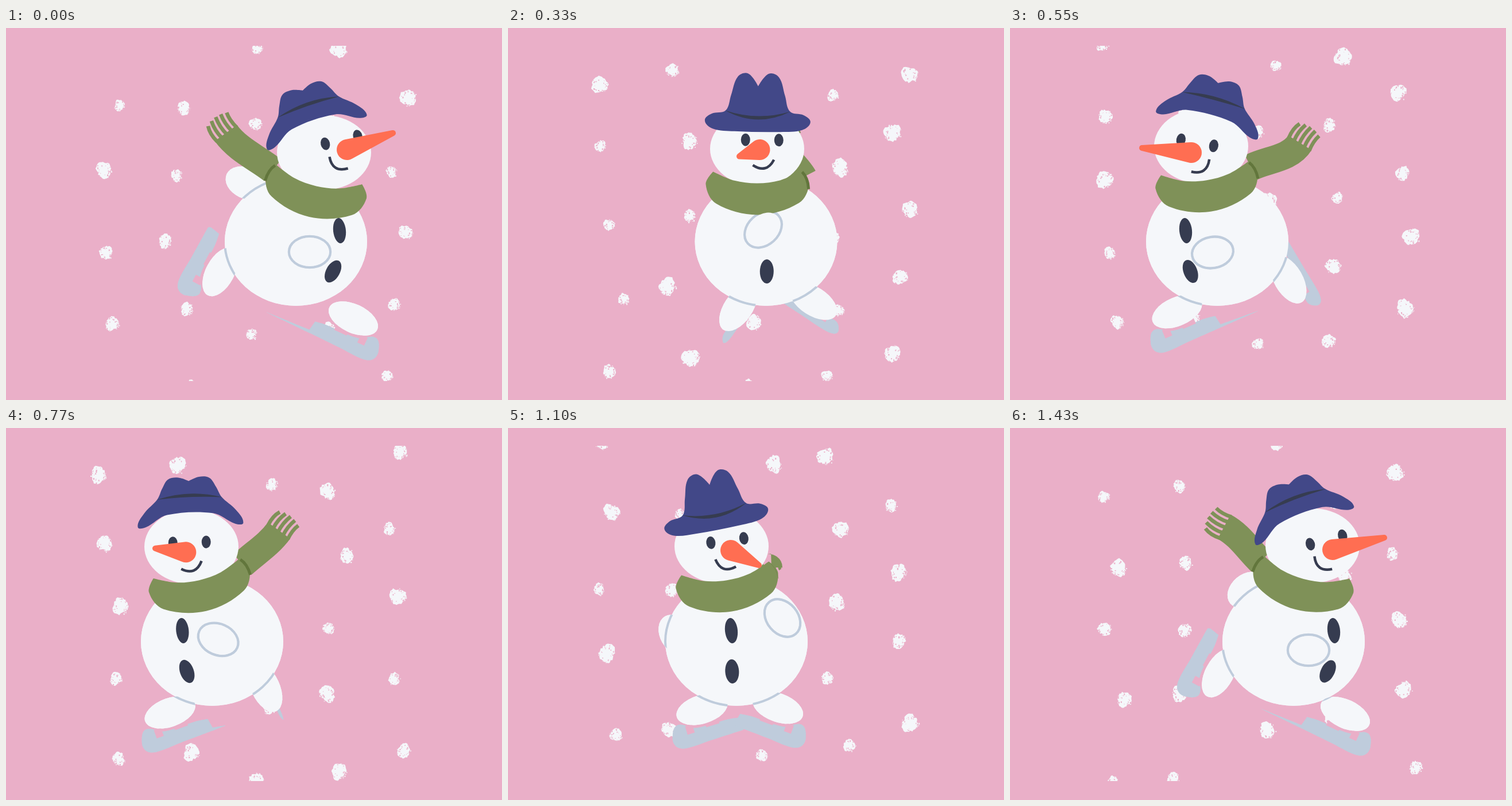
Recreate the animation shown at these times as an HTML page with a canvas. Size 864 by 648 pixels, loop 1540 ms.

```html
<!DOCTYPE html>
<html lang="en">
<head>
<meta charset="utf-8">
<title>Skating snowman</title>
<style>
  html, body { margin: 0; width: 100%; height: 100%; overflow: hidden; background: #eaafc8; }
  canvas { display: block; }
</style>
</head>
<body>
<canvas id="stage" width="864" height="648"></canvas>
<script>
const ctx = document.getElementById('stage').getContext('2d');
const PINK = '#eaafc8', SNOW = '#f5f7fa', ICE = '#bfccdc', NAVY = '#424888',
      INK = '#363c50', GREEN = '#7f9158', MOSS = '#62763c', CARROT = '#ff6e52';
const STEP = 110, COUNT = 14, RAD = Math.PI / 180;

// body: x. hat: tilt, curl of the brim. face: nose base seen from the head. nose: base to tip.
// hand, arm: x, y, turn. back, front foot: x, y, toe direction, side shown, runner length.
// tail: scarf end x, y, direction.
const poses = [
  { step: 0, body: 505, head: [554, 217], hat: [-19, 45], neck: 13, face: [40, -5], nose: [80, -29], chest: 76,
    hand: [529, 390, 0], arm: [418, 270, 25], back: [373, 425, 118, 1, 0], front: [605, 506, 25, 1, 82], tail: [383, 183, -126] },
  { step: 2, body: 510, head: [495, 205], hat: [2, 0], neck: 3, face: [13, 1], nose: [17, 0], chest: 28,
    hand: [448, 327, -35], arm: [640, 355, 90], back: [484, 485, 88, 0.35, 0], front: [567, 492, 20, 1, 0], tail: [403, 167, -88] },
  { step: 4, body: 389, head: [373, 216], hat: [0, 0], neck: -4, face: [-4, 2], nose: [-88, 23], chest: -25,
    hand: [441, 375, -50], arm: [283, 360, 90], back: [318, 490, 160, -1, 50], front: [497, 460, 45, 0.12, 0], tail: [544, 195, 5] },
  { step: 5, body: 361, head: [333, 206], hat: [15, 42], neck: -9, face: [-17, 11], nose: [-86, -8], chest: -55,
    hand: [353, 391, -10], arm: [361, 372, 60], back: [291, 494, 157, -1, 72], front: [485, 438, 60, -0.6, 0], tail: [505, 200, -58] },
  { step: 8, body: 358, head: [318, 207], hat: [-11, 47], neck: -15, face: [-6, 9], nose: [-37, -6], chest: -50,
    hand: [378, 357, 40], arm: [358, 372, 60], back: [283, 496, 162, -1, 0], front: [435, 458, 68, 0.12, 0], tail: [461, 168, -52] },
  { step: 10, body: 398, head: [372, 206], hat: [-11, 0], neck: -9, face: [16, 7], nose: [49, 26], chest: -9,
    hand: [478, 331, 50], arm: [292, 360, 60], back: [338, 490, 163, -1, 0], front: [470, 487, 20, 1, 0], tail: [454, 243, -90] },
  { step: 13, body: 494, head: [527, 205], hat: [-21, 45], neck: 15, face: [35, 7], nose: [90, -21], chest: 70,
    hand: [520, 387, 0], arm: [412, 282, -40], back: [365, 427, 118, 1, 0], front: [584, 498, 25, 1, 78], tail: [373, 172, -152] }
];

const mix = (a, b, k) => Array.isArray(a) ? a.map((v, i) => mix(v, b[i], k)) : a + (b - a) * k;

function poseAt(step) {
  const a = poses.filter(p => p.step <= step).pop();
  const b = poses.find(p => p.step > step) || { ...poses[0], step: COUNT };
  const k = (step - a.step) / (b.step - a.step);
  return Object.fromEntries(Object.keys(a).map(key => [key, mix(a[key], b[key], k)]));
}

function place([x, y], turn, paint) {
  ctx.save();
  ctx.translate(x, y);
  ctx.rotate(turn * RAD);
  paint();
  ctx.restore();
}

// Smooth closed curve through points; a third value marks a corner.
function blob(pts, color) {
  const n = pts.length, at = i => pts[(i + n) % n];
  const dir = i => {
    const [x, y] = at(i - 1), [u, v] = at(i + 1), d = Math.hypot(u - x, v - y) || 1;
    return at(i)[2] ? [0, 0] : [(u - x) / d, (v - y) / d];
  };
  ctx.fillStyle = color;
  ctx.beginPath();
  ctx.moveTo(pts[0][0], pts[0][1]);
  for (let i = 0; i < n; i++) {
    const p = at(i), q = at(i + 1), s = dir(i), e = dir(i + 1);
    const h = Math.hypot(q[0] - p[0], q[1] - p[1]) / 3;
    ctx.bezierCurveTo(p[0] + s[0] * h, p[1] + s[1] * h, q[0] - e[0] * h, q[1] - e[1] * h, q[0], q[1]);
  }
  ctx.fill();
}

function ovalPath(x, y, rx, ry, turn = 0) {
  ctx.beginPath();
  ctx.ellipse(x, y, rx, ry, turn * RAD, 0, Math.PI * 2);
}

function oval(color, ...shape) {
  ovalPath(...shape);
  ctx.fillStyle = color;
  ctx.fill();
}

function stroke(color, width) {
  ctx.strokeStyle = color;
  ctx.lineWidth = width;
  ctx.stroke();
}

function bow(color, width, x, y, cx, cy, u, v) {
  ctx.beginPath();
  ctx.moveTo(x, y);
  ctx.quadraticCurveTo(cx, cy, u, v);
  stroke(color, width);
}

// Mirrors a right half and joins both into one outline.
const mirror = half => [...half, ...half.slice().reverse().map(([x, y, c]) => [-x, y, c])];

function skate([x, y, toe, side, runner]) {
  place([x, y], toe, () => {
    ctx.scale(1, side);
    blob([[-60 - runner, 54, 1], [-61, 50, 1], [-58, 33, 1], [-38, 30], [20, 28], [50, 14],
          [64, 34], [61, 50], [45, 57], [0, 56], [-58, 55, 1]], ICE);
    ctx.fillStyle = PINK;
    ctx.fillRect(24, 20, 13, 15);
    ctx.fillRect(-22, 20, 24, 12);
  });
}

// Limbs sit behind the body; a seam follows the body's edge across each one.
function trunk(p) {
  const body = [p.body, 372, 124, 112];
  const limbs = [[...p.arm.slice(0, 2), 37, 27, p.arm[2]],
    ...[p.back, p.front].map(([x, y, toe]) => [x, y, 46, 25, toe])];
  skate(p.back);
  skate(p.front);
  for (const limb of limbs) oval(SNOW, ...limb);
  oval(SNOW, ...body);
  for (const limb of limbs) {
    ctx.save();
    ovalPath(...limb);
    ctx.clip();
    ovalPath(...body);
    stroke(ICE, 4);
    ctx.restore();
  }
  oval(INK, p.body + p.chest, 353, 11, 22, -6);
  oval(INK, p.body + p.chest * 0.85, 424, 12, 21, p.chest * 0.38);
}

function scarfTail(p) {
  const side = p.tail[0] < p.head[0] ? -1 : 1, c = Math.cos(p.neck * RAD), s = Math.sin(p.neck * RAD);
  const x = p.head[0] + side * 80 * c - 50 * s, y = p.head[1] + side * 80 * s + 50 * c;
  const [u, v, turn] = p.tail, reach = Math.hypot(u - x, v - y);
  const pull = reach * 0.35, a = turn * RAD;
  ctx.beginPath();
  ctx.moveTo(x, y);
  ctx.bezierCurveTo(mix(x, u, 0.33), mix(y, v, 0.33), u - Math.cos(a) * pull, v - Math.sin(a) * pull, u, v);
  stroke(GREEN, 48);
  const length = Math.min(30, reach / 3);
  place([u, v], turn, () => {
    for (let k = -1; k <= 1; k += 0.5)
      bow(GREEN, 6.5, -3, k * 21, length * 0.5, k * 21 - 3, length + 3 - 5 * k * k, k * 20 + 2);
  });
  return [side, Math.min(5, reach / 12)];
}

function scarf(p, [side, crease]) {
  place(p.head, p.neck, () => {
    ctx.translate(0, 39);
    blob([[-77, 0, 1], [-40, 16], [0, 21], [40, 16], [77, 0, 1],
          [90, 22], [72, 56], [0, 76], [-72, 56], [-90, 22]], GREEN);
    bow(MOSS, crease, side * 78, 2, side * 88, 12, side * 89, 32);
  });
}

function hat(p) {
  const [tilt, curl] = p.hat;
  const bend = ([x, y, c]) => {
    const soft = Math.max(0, Math.min(1, (y + 83) / 65));
    return [x, y - curl * (1 - (x / 92) ** 2) * soft, c];
  };
  const half = [[0, -61, 1], [18, -83], [36, -77], [47, -45], [56, -18], [80, -12], [92, 0], [78, 14], [40, 18]];
  place(p.head, tilt, () => {
    ctx.translate(0, curl * 0.22 - 48);
    blob(mirror(half).map(bend), NAVY);
    const [x, y] = bend([57, -18]), mid = bend([0, -6])[1] * 2 - y;
    ctx.fillStyle = INK;
    ctx.beginPath();
    ctx.moveTo(-x, y);
    ctx.quadraticCurveTo(0, mid - 6, x, y);
    ctx.quadraticCurveTo(0, mid + 6, -x, y);
    ctx.fill();
  });
}

function face(p) {
  const [dx, dy] = p.nose, base = [p.head[0] + p.face[0], p.head[1] + p.face[1]];
  const look = p.hat[0] * 0.7;
  place([base[0] - dx * 0.12, base[1] - 17], look, () => {
    for (const side of [-1, 1]) oval(INK, side * 29, 0, 8, 11);
  });
  place([base[0] - dx * 0.2, base[1] + 25], dx * 0.4, () => bow(INK, 4.5, -19, -3, 0, 18, 19, -3));
  place(base, Math.atan2(dy, dx) / RAD, () => {
    const length = Math.hypot(dx, dy), open = Math.acos(Math.min(1, 13 / length));
    ctx.fillStyle = CARROT;
    ctx.beginPath();
    ctx.arc(0, 0, 18, open, Math.PI * 2 - open);
    ctx.arc(length, 0, 5, -open, open);
    ctx.fill();
  });
}

const randomFrom = seed => () => (seed = (seed * 16807) % 2147483647) / 2147483647;

// Ragged lump with small chips punched around its rim.
function flake(x, y, r, rnd) {
  const sides = 30, lean = rnd() * 6, wobble = rnd() * 6;
  ctx.beginPath();
  for (let i = 0; i < sides; i++) {
    const a = i / sides * Math.PI * 2;
    const d = r * (0.95 + 0.08 * Math.sin(2 * a + lean) + 0.07 * Math.sin(3 * a + wobble) + (rnd() - 0.5) * 0.22);
    ctx.lineTo(x + Math.cos(a) * d, y + Math.sin(a) * d * 1.08);
  }
  ctx.closePath();
  for (let i = 0; i < 24; i++) {
    const a = rnd() * 7, d = r * (0.5 + rnd() * 0.55), s = 0.7 + rnd() * 1.5;
    ctx.rect(x + Math.cos(a) * d, y + Math.sin(a) * d, s, s * (0.6 + rnd()));
  }
  ctx.fill('evenodd');
}

// Lanes of flakes fall three rows per loop and jitter at every step.
function snowfall(step) {
  const gap = 125, lanes = [[180, 10], [300, 2], [440, 45], [575, 37], [685, 115]];
  const rnd = randomFrom(4001 + step * 977);
  ctx.save();
  ctx.beginPath();
  ctx.rect(139, 31, 581, 584);
  ctx.clip();
  ctx.fillStyle = SNOW;
  for (const [x, phase] of lanes) {
    const top = (phase + step * 3 * gap / COUNT) % gap;
    for (let y = top; y < 630; y += gap)
      flake(x + (rnd() - 0.5) * 46, y + (rnd() - 0.5) * 26, 9 + rnd() * 6, rnd);
  }
  ctx.restore();
}

function draw(step) {
  const p = poseAt(step), [hx, hy, turn] = p.hand;
  ctx.fillStyle = PINK;
  ctx.fillRect(0, 0, 864, 648);
  ctx.lineCap = 'butt';
  trunk(p);
  snowfall(step);
  redrawFigure(p, hx, hy, turn);
}

function redrawFigure(p, hx, hy, turn) {
  trunk(p);
  ovalPath(hx, hy, 36, 27, turn);
  stroke(ICE, 4.5);
  const knot = scarfTail(p);
  oval(SNOW, ...p.head, 82, 65);
  scarf(p, knot);
  oval(SNOW, hx, hy, 34, 25, turn);
  hat(p);
  face(p);
}

let shown = -1;
function tick() {
  const step = Math.floor(performance.now() / STEP) % COUNT;
  if (step !== shown) draw(shown = step);
  requestAnimationFrame(tick);
}
tick();
</script>
</body>
</html>
```
